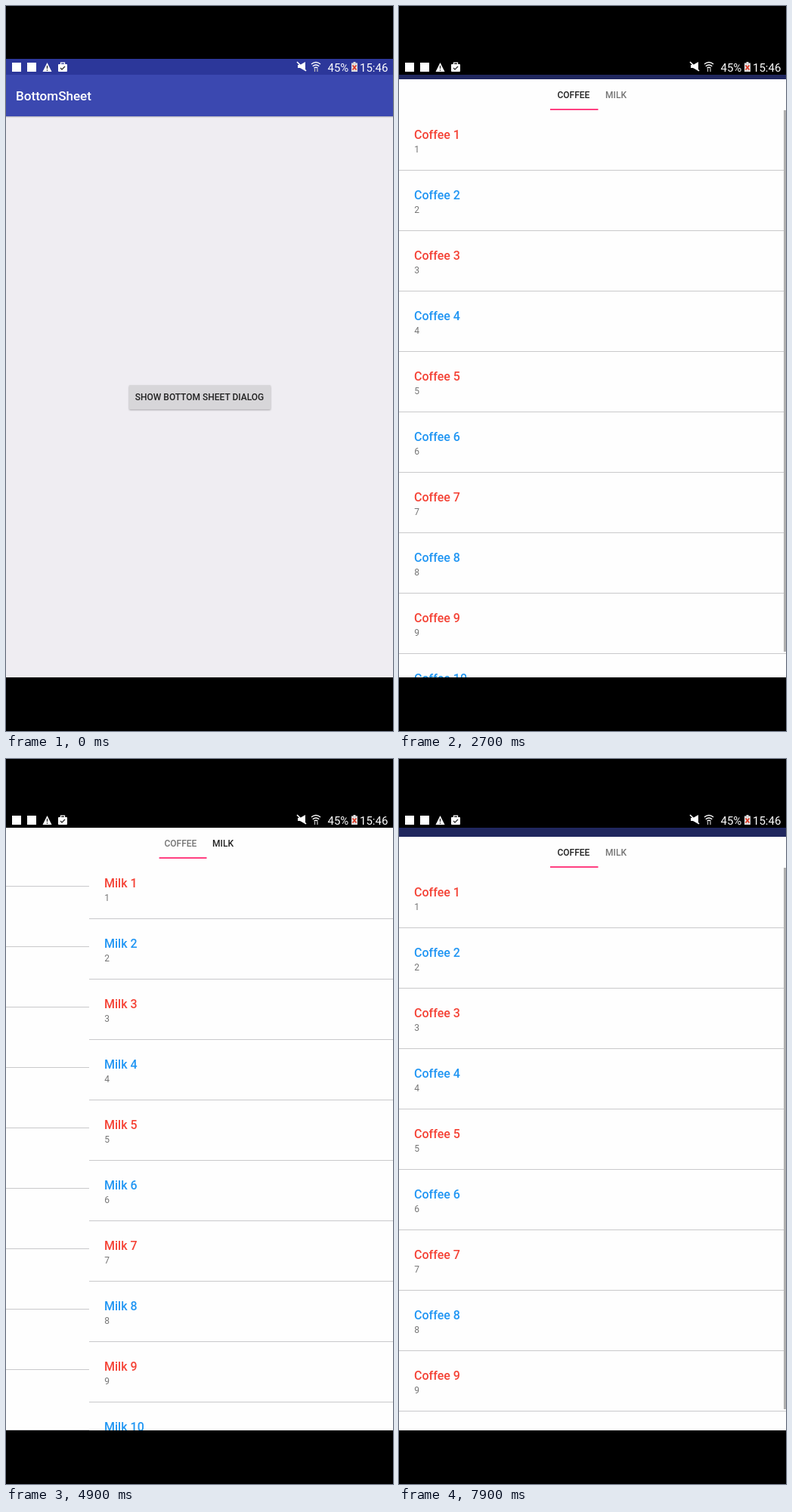
Write an HTML page that moves like this. It is 512x960 px and loops after 8000 ms.

```html
<!DOCTYPE html>
<html lang="en">
<head>
<meta charset="utf-8">
<title>Bottom sheet</title>
<style>
  html, body { margin: 0; width: 100%; height: 100%; overflow: hidden; background: #000; }
  svg { display: block; width: 100vw; height: 100vh; font-family: Roboto, sans-serif; }
  .medium { font-weight: 500; }
  .tab, .sub, .label { font-size: 12px; }
  .name { font-size: 16px; }
  .sub { fill: #757575; }
</style>
</head>
<body>
<svg viewBox="0 0 512 960">
  <defs>
    <clipPath id="listClip"><rect y="41" width="512" height="800"/></clipPath>
    <clipPath id="rowClip"><rect y="441" width="512" height="79"/></clipPath>
  </defs>

  <rect width="512" height="960"/>
  <rect y="91" width="512" height="798" fill="#efedf2"/>
  <rect y="146" width="512" height="1" fill="#b9b8c4"/>
  <rect y="147" width="512" height="1" fill="#dddce2"/>
  <rect y="91" width="512" height="55" fill="#3b48b0"/>
  <text class="medium" x="13" y="125" font-size="17.07" fill="#fff">BottomSheet</text>
  <rect id="button" x="163" y="502" width="187" height="32" rx="1" fill="#d7d6d9"/>
  <text class="medium label" x="256" y="522" text-anchor="middle" fill="#222">SHOW BOTTOM SHEET DIALOG</text>
  <rect id="scrim" y="91" width="512" height="798" opacity="0"/>

  <g id="sheet">
    <rect width="512" height="800" fill="#fefefe"/>
    <g clip-path="url(#listClip)">
      <g id="coffee">
        <g id="ripple" clip-path="url(#rowClip)">
          <rect y="441" width="512" height="79" fill="#f7f7f6"/>
          <circle id="wave" cx="218" cy="495" fill="#ececec"/>
        </g>
      </g>
      <g id="milk"></g>
      <rect id="bar" x="509" width="3" height="717" fill="#b0b0b0"/>
    </g>
    <text id="coffeeTab" class="medium tab" x="209.5" y="25.3">COFFEE</text>
    <text id="milkTab" class="medium tab" x="273" y="25.3">MILK</text>
    <rect id="marker" y="39" height="2" fill="#ff4081"/>
  </g>

  <rect id="status" y="70" width="512" height="21"/>
  <g fill="#fff">
    <rect x="8" y="75" width="12" height="12"/>
    <rect x="28" y="75" width="12" height="12"/>
    <path d="M54.500 75L60.500 87H48.500Z"/>
    <path d="M54.500 79v4m0 1.200v1.500" stroke="#333" stroke-width="1.400"/>
    <rect x="69" y="77" width="12" height="10" rx="1"/>
    <path d="M72.500 77v-1.800h5V77" fill="none" stroke="#fff" stroke-width="1.300"/>
    <path d="M72 82l2 2 4-4" fill="none" stroke="#333" stroke-width="1.400"/>
    <path d="M386 78h3l7-4v12l-7-4h-3Z"/>
    <path d="M385 74l12 12" stroke="#fff" stroke-width="1.600"/>
    <path d="M404 77q6-5 12 0M405.700 79.800q4.300-3.500 8.600 0M407.500 82.300q2.500-2 5 0" fill="none" stroke="#fff" stroke-width="1.400"/>
    <path d="M408.500 83v4m3.500-4v4" stroke="#bbb" stroke-width="1.300"/>
    <text x="425.500" y="86.500" font-size="15">45%</text>
    <path d="M459.500 74h3v1.500h2.500V87h-8V75.500h2.500Z" fill="#ddd"/>
    <path d="M458.500 78.500l5 6m0-6l-5 6" stroke="#e03a26" stroke-width="1.800"/>
    <text x="468" y="86.500" font-size="15">15:46</text>
  </g>
  <rect y="889" width="512" height="71"/>
</svg>

<script>
const LOOP = 8000, STEP = 100;
const WIDTH = 512, MAX_SCROLL = 43, TOP = 91, PEEK = 633;
const TO_MILK = 4847, TO_COFFEE = 6650;
// times between which the scrollbar stays awake
const barTimes = [[1465, 1950], [2400, 2900], [3370, 3950], [5700, 6250], [7450, 9000]];

const $ = id => document.getElementById(id);
const set = (id, attrs) => {
  for (const key in attrs) $(id).setAttribute(key, attrs[key]);
};
const move = (id, x, y) =>
  set(id, { transform: `translate(${Math.round(x)} ${Math.round(y)})` });

const linear = p => p;
const accelerate = p => p * p;
const smooth = p => p * p * (3 - 2 * p);
const smoother = p => p * p * p * (10 + p * (6 * p - 15));
const easeOut = power => p => 1 - (1 - p) ** power;
const ramp = (t, start, end, ease = linear) =>
  ease(Math.min(1, Math.max(0, (t - start) / (end - start))));

function addRows(id, title) {
  let rows = "";
  for (let i = 1; i <= 10; i++) {
    const y = (i - 1) * 80;
    rows += `<text class="medium name" x="20" y="${y + 79}" fill="${i % 2 ? "#f44336" : "#2196f3"}">${title} ${i}</text>
      <text class="sub" x="20.3" y="${y + 96.5}">${i}</text>
      <rect y="${y + 120}" width="${WIDTH}" height="1" fill="#c9c9cb"/>`;
  }
  $(id).insertAdjacentHTML("beforeend", rows);
}

function draw(t) {
  const open = ramp(t, 1465, 1615, accelerate);
  const shadow = t >= 1350 ? "0 1px 3px rgba(0,0,0,.3)" : "0 1px 1px rgba(0,0,0,.3)";
  set("button", { style: `filter: drop-shadow(${shadow})` });
  set("scrim", { opacity: 0.465 * ramp(t, 1390, 1560) });
  set("status", { fill: t >= 1400 ? "#000" : "#2c379a" });

  const top = PEEK + 160 * (1 - open)
    - (PEEK - TOP) * ramp(t, 2350, 2800, easeOut(3))
    + 24 * ramp(t, 7800, 8000);
  move("sheet", 0, top);
  set("sheet", { opacity: open });

  const coffeeScroll = MAX_SCROLL * (ramp(t, 3370, 3745, smooth) - ramp(t, 7450, 7780, smooth));
  const milkScroll = MAX_SCROLL * ramp(t, 5680, 6150, smooth);
  const page = ramp(t, TO_MILK, TO_MILK + 200, easeOut(5)) - ramp(t, TO_COFFEE, TO_COFFEE + 200, easeOut(5));
  move("coffee", -WIDTH * page, -coffeeScroll);
  move("milk", WIDTH * (1 - page), -milkScroll);

  const onMilk = t >= TO_MILK && t < TO_COFFEE;
  set("coffeeTab", { fill: onMilk ? "#757575" : "#212121" });
  set("milkTab", { fill: onMilk ? "#212121" : "#757575" });
  const slide = ramp(t, TO_MILK, TO_MILK + 300, smoother) - ramp(t, TO_COFFEE, TO_COFFEE + 300, smoother);
  set("marker", { x: 200 + 63 * slide, width: 63.5 - 14.5 * slide });

  set("ripple", { opacity: t < 3300 ? 0 : 1 - ramp(t, 3520, 3820) });
  set("wave", { r: 128 * ramp(t, 3300, 3500) + 90 * ramp(t, 3500, 3800) });

  const awake = barTimes.find(([show, hide]) => t >= show && t < hide + 200);
  set("bar", {
    y: Math.round(41 + (onMilk ? milkScroll : coffeeScroll) * 0.946),
    opacity: awake ? 1 - ramp(t, awake[1], awake[1] + 200) : 0
  });
}

addRows("coffee", "Coffee");
addRows("milk", "Milk");

const start = performance.now();
function tick() {
  const t = (performance.now() - start) % LOOP;
  draw(Math.floor(t / STEP) * STEP);
  requestAnimationFrame(tick);
}
tick();
</script>
</body>
</html>
```
